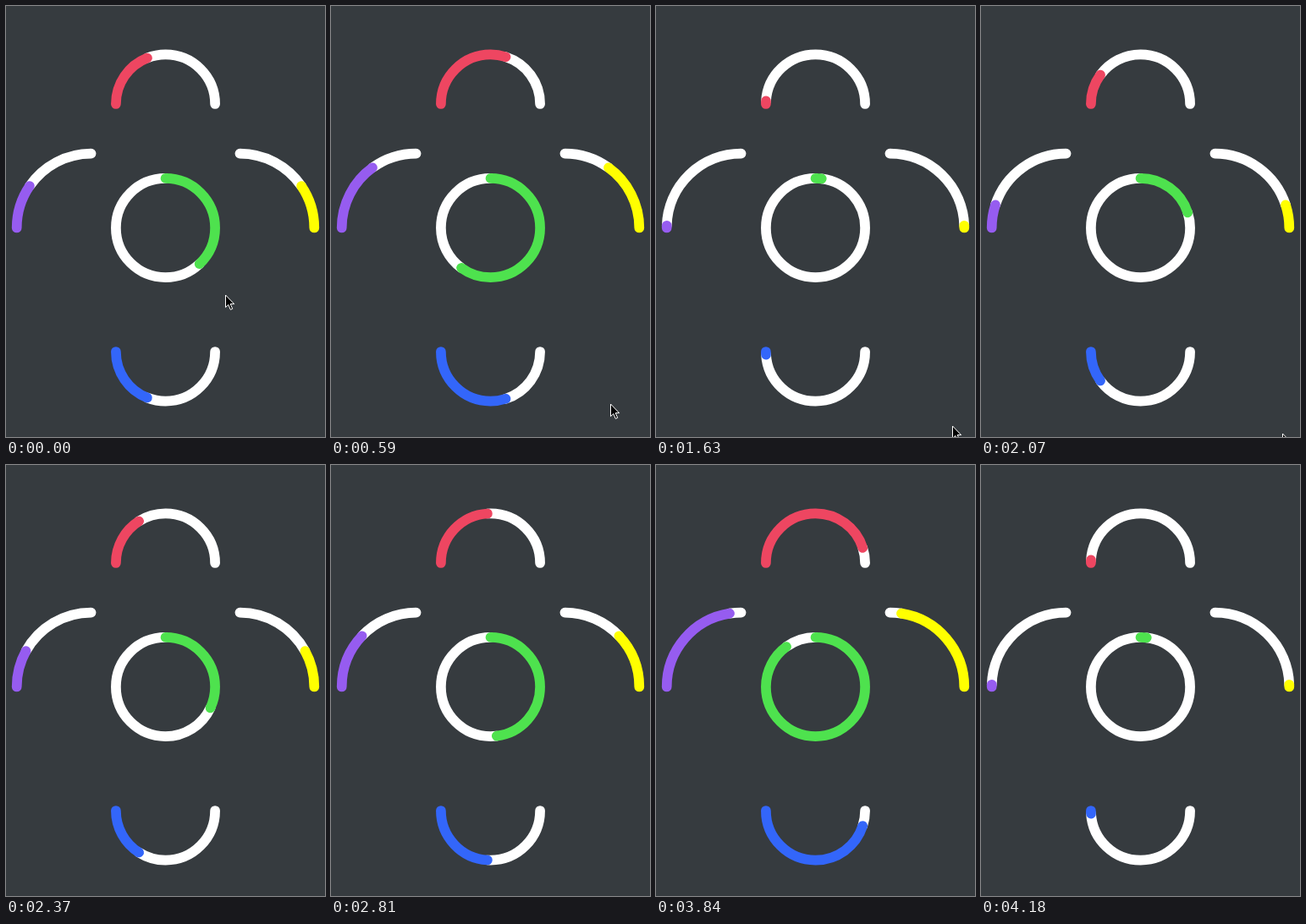
These frames come from a looping animation (377 px wide and 510 px high, 4.28 s). An HTML page:

```html
<!DOCTYPE html>
<html lang="en">
<head>
<meta charset="utf-8">
<title>Progress arcs</title>
<style>
  html, body { margin: 0; width: 100%; height: 100%; overflow: hidden; background: #363b3f; }
  svg { display: block; width: 377px; height: 510px; }
  #arcs path { fill: none; stroke-width: 20; stroke-linecap: round; }
</style>
</head>
<body>
<svg viewBox="0 0 377 510">
  <g id="arcs" transform="translate(188.5 262.5) scale(.586)"></g>
  <path id="cursor" d="M0 0V14.6L3.3 11.5L5.8 17.3L8.2 16.3L5.7 10.6H10.2Z"
        fill="#000" stroke="#fff" stroke-width="1"/>
</svg>
<script>
const LOOP = 4280;
const TICK = 147.8;

// Paths in units around the centre of the ring
const ARCS = [
  ['#ee4661', 'M-100 -250A100 100 0 0 1 100 -250'],
  ['#3366fa', 'M-100 250A100 100 0 0 0 100 250'],
  ['#965cf0', 'M-300 0A150 150 0 0 1 -150 -150'],
  ['#ffff00', 'M300 0A150 150 0 0 0 150 -150'],
  ['#4ee24e', 'M0 -100A100 100 0 0 1 0 100A100 100 0 0 1 0 -100']
];

const group = document.getElementById('arcs');
const cursor = document.getElementById('cursor');

function addPath(d, color) {
  const path = document.createElementNS('http://www.w3.org/2000/svg', 'path');
  path.setAttribute('d', d);
  path.setAttribute('stroke', color);
  path.setAttribute('pathLength', 1);
  return group.appendChild(path);
}

const bars = ARCS.map(([color, d]) => ({ rest: addPath(d, '#fff'), done: addPath(d, color) }));

// The bars grow in steps of 2 %, sampled once per tick
const progress = tick => Math.floor(19.2 + 2.93 * tick) % 50 / 50;

// Fast start that decays into a slow steady drift
const glide = (distance, decay, drift, tick) =>
  Math.round(distance * (1 - Math.exp(-decay * tick)) + drift * tick);

function draw(time) {
  const tick = Math.floor((time + 2) / TICK);
  const part = progress(tick);
  for (const { rest, done } of bars) {
    done.setAttribute('stroke-dasharray', `${part} 2`);
    rest.setAttribute('stroke-dasharray', `${1 - part} 2`);
    rest.setAttribute('stroke-dashoffset', -part);
  }
  const x = 259.5 + glide(70.2, .583, 1.9, tick);
  const y = 342 + glide(123.7, .745, 2.85, tick);
  cursor.setAttribute('transform', `translate(${x} ${y})`);
}

const start = performance.now();
function frame() {
  draw((performance.now() - start) % LOOP);
  requestAnimationFrame(frame);
}
frame();
</script>
</body>
</html>
```
